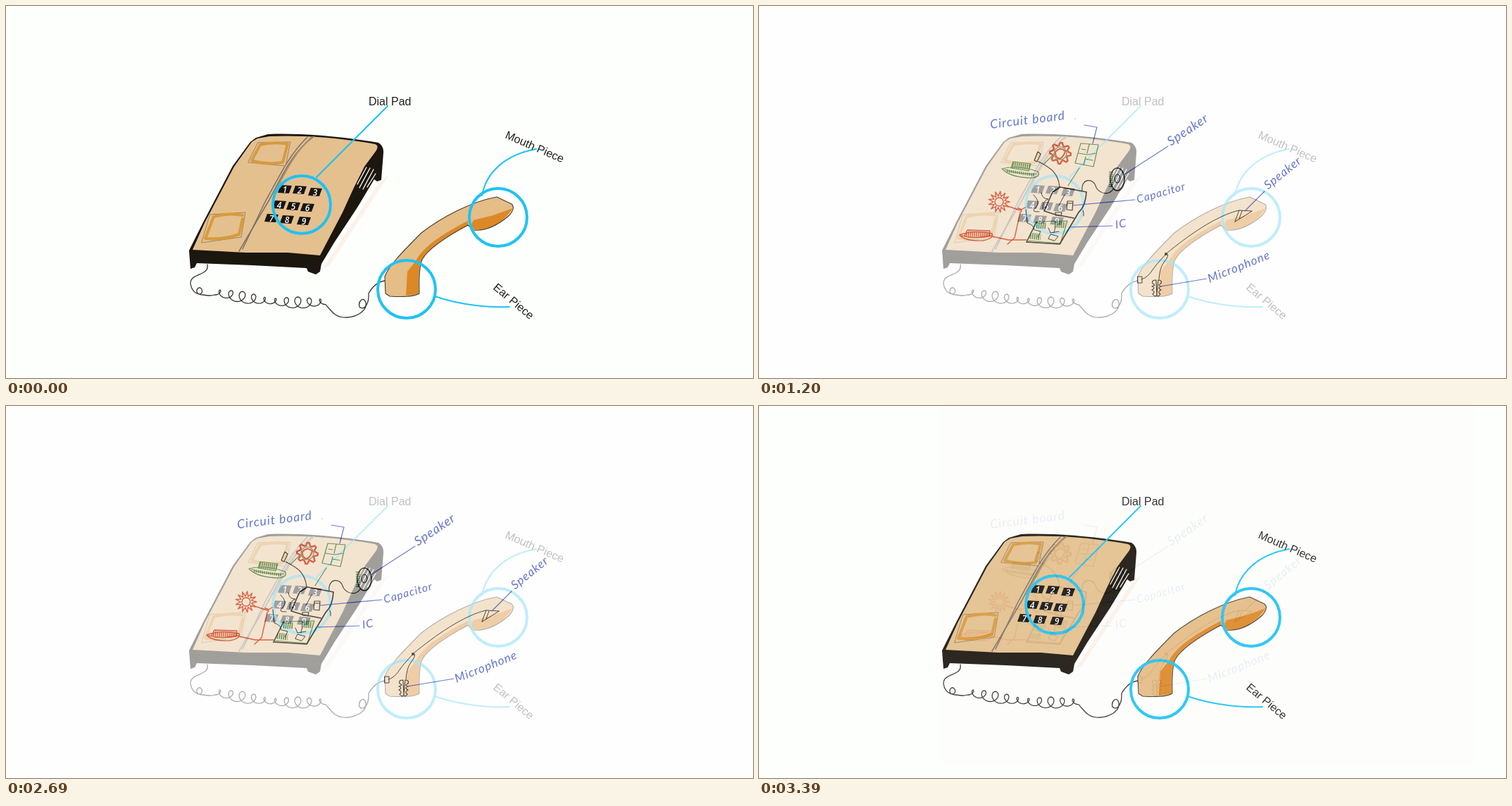
An HTML page for the animation above (3490 ms loop, 1061 by 528 pixels).

```html
<!DOCTYPE html>
<html lang="en">
<head>
<meta charset="utf-8">
<title>Telephone</title>
<style>
html, body { margin: 0; width: 100%; height: 100%; overflow: hidden; background: #fdfffc; }
svg { display: block; }
path, ellipse, circle { fill: none; stroke-linecap: round; stroke-linejoin: round; }
.label { font: 16px "Liberation Sans", Arial, sans-serif; fill: #202020; }
.note { font: italic 16px Lato, "Open Sans", sans-serif; letter-spacing: 1px; fill: #2f43b4; }
.digit { font: italic 600 12px "Open Sans", sans-serif; fill: #fff; text-anchor: middle; }
.ring { stroke: #1ec2f4; stroke-width: 4; }
.lead { stroke: #1ec2f4; stroke-width: 2; }
.ink { stroke: #1c1e21; stroke-width: 1.2; }
.blue { stroke: #3a4db8; stroke-width: 1.2; }
.green { stroke: #3f8449; stroke-width: 1.2; }
.red { stroke: #d2402f; stroke-width: 1.4; }
.hatch { stroke-linecap: butt; stroke-dasharray: 1.6 1.3; }
.bold { stroke-width: 1.7; }
.thin { stroke-width: 1; }
</style>
</head>
<body>
<svg width="1061" height="528" viewBox="0 0 1061 528">
<g id="phone">
  <path d="M545 238L528 253 450 372 459 369Z" style="fill:#fbf2ea"/>
  <path d="M372 182C410 180 470 184 529 194Q537 199 536 209L533 247 527 249 523 246 499 286 466 336 448 366 446 377 440 381 429 377 427 372 350 368 271 365 268 371 262 373 260 347 280 307 322 227 347 193 355 187Z" style="fill:#1b160e"/>
  <path d="M374 185C420 183 475 187 524 196Q530 198 526 205L509 228 494 258 478 293 446 354 400 350 340 350 265 346 282 308 324 228 349 193 357 188Z" style="fill:#e4c08e"/>
  <path d="M437 185C408 207 396 233 374 275L331 348" stroke="#857460" stroke-width="1.6"/>
  <path d="M428 186C402 212 392 235 368 278L336 345" stroke="#76716d" stroke-width="1.5"/>
  <path d="M433 187C405 214 397 238 380 266" stroke="#a5916f" stroke-width="2"/>
  <path d="M358 194L404 193 397 227 344 222Z" stroke="#9b8463" stroke-width="1"/>
  <path d="M361 197Q382 192 400 196L393 222Q369 226 349 219Z" stroke="#d69a40" stroke-width="4"/>
  <path d="M290 296L340 293 334 328 278 336Z" stroke="#9b8463" stroke-width="1"/>
  <path d="M295 299Q316 293 336 297M295 299L283 330Q309 332 331 324L336 302" stroke="#d99a3b" stroke-width="4"/>
  <path d="M512 229L499 253M517 230L502 258M522 232L507 260M525 238L513 257" stroke="#f4f1eb" stroke-width="1.4"/>
  <g id="keys"></g>
  <path id="cord" stroke="#363636" stroke-width="1.3"/>
  <path d="M697 271L718 281Q724 286 715 297C700 310 683 320 664 318L656 311C630 325 600 343 591 360Q586 371 587 408Q578 414 545 412L539 408 538 384C543 370 560 352 590 322C620 299 660 278 697 271Z" style="fill:#e5bd86"/>
  <path d="M720 287L692 297 664 304Q658 312 665 317C686 319 704 309 720 287ZM656 305C625 321 594 339 582 362L570 377 568 411 586 409Q585 371 590 360C602 341 630 324 656 312Z" style="fill:#dc8827"/>
  <path d="M697 271L718 281Q724 286 715 297C700 310 683 320 664 318L656 311C630 325 600 343 591 360Q586 371 587 408Q578 414 545 412L539 408 538 384C543 370 560 352 590 322C620 299 660 278 697 271Z" stroke="#4a3c2a" stroke-width="1.1"/>
</g>

<g>
  <circle class="ring" cx="420" cy="282" r="41"/>
  <circle class="ring" cx="699" cy="300" r="41"/>
  <circle class="ring" cx="569" cy="402" r="41"/>
  <path class="lead" d="M542 142L441 243M676 269C682 236 709 211 753 203M609 412Q660 429 715 427"/>
  <text class="label" x="515" y="141">Dial Pad</text>
  <text class="label" transform="translate(708 187) rotate(23.5)">Mouth Piece</text>
  <text class="label" transform="translate(691 401) rotate(40)">Ear Piece</text>
</g>

<g id="inside" opacity="0">
  <path d="M0 0H1061V528H0Z" style="fill:#fefefe"/>
  <use href="#phone" opacity=".18"/>

  <path class="green" d="M457 195L482 197 475 228 449 223ZM469 196L466 209M464 214L461 226M454 209L466 211 479 209M458 203L464 204M463 217L474 219M455 230L439 255M405 224L416 213"/>
  <path class="green" d="M345 231Q368 225 396 235Q401 242 388 244Q358 244 345 231ZM349 232Q372 240 394 238M358 230L361 221 386 224 383 234Z"/>
  <path class="green hatch" d="M360 226L385 229" style="stroke-width:8"/>
  <path class="green hatch" d="M352 234L392 240" style="stroke-width:4"/>
  <path class="green" d="M394 306L438 305 428 337 381 333Z"/>
  <path class="green hatch" d="M394 311L408 312M420 310L435 311M385 326L400 328" style="stroke-width:9"/>
  <path class="green hatch" d="M500 235V258" style="stroke-width:6"/>

  <path id="gear" class="red" style="stroke-width:2.4"/>
  <circle class="green" cx="428" cy="209" r="9"/>
  <path class="red" d="M421 207Q428 199 435 206Q433 214 427 217Q420 214 421 207Z" style="stroke-width:2"/>
  <path id="sun" class="red"/>
  <circle class="red" cx="341" cy="278" r="6"/>
  <path class="red" d="M353 284L371 290 378 286M368 287Q376 289 371 293L363 329 353 338M285 325Q305 317 331 323Q334 330 318 333Q292 334 285 325ZM288 326Q308 331 330 326M292 326L296 318 328 319 327 327M331 327L354 332 380 332"/>
  <path class="red hatch" d="M294 323L328 324" style="stroke-width:7"/>

  <path class="ink" d="M391 219L396 207 400 210 395 221ZM397 221C413 229 425 236 427 257"/>
  <path class="ink bold" d="M405 291L417 264 428 257 465 264Q464 284 454 293L427 338 380 335M405 291L421 296 447 301"/>
  <path class="ink" d="M459 262C457 244 476 243 479 258C486 268 498 268 503 260M380 335L394 307"/>
  <path class="ink" d="M438 277H446L445 290 437 289ZM438 280H446M421 293H430L429 298 421 297Z"/>
  <path class="ink thin" d="M434 268L426 283M460 290Q462 294 461 298M401 265Q402 274 411 274Q402 277 403 288M390 268Q401 279 393 286Q385 293 398 292M379 289L381 308Q391 311 391 318M392 318L400 320 396 328M411 315L414 322 426 320M411 330L414 324 425 327 420 333ZM421 313L419 322"/>
  <ellipse class="ink bold" cx="509" cy="246" rx="10" ry="16"/>
  <ellipse class="ink" cx="509" cy="245" rx="4" ry="6"/>

  <path class="ink thin" d="M676 306L682 290 700 291ZM682 302L686 291M682 290C650 297 608 327 579 351Q565 366 560 373Q552 386 543 388M579 351Q584 353 575 364Q569 372 568 388M538 384H544V393H538Z"/>
  <circle cx="578" cy="352" r="2" style="fill:#1c1e21"/>
  <path class="ink" d="M564 389Q557 389 559 394Q565 396 558 398Q564 400 558 403Q564 406 559 409Q563 414 565 410ZM567 389Q573 389 571 394Q565 396 571 398Q565 400 571 403Q565 406 570 409Q567 414 565 410Z"/>

  <path class="blue" d="M449 160h.2M462 169L480 172 474 195M581 199L519 239M534 275L446 283M502 312L440 314M718 263L690 291M636 387L570 398"/>
  <g id="notes"></g>
</g>
</svg>

<script>
const get = id => document.getElementById(id);

// Dial pad
get("keys").innerHTML = [
  [396, 260], [417, 261], [439, 264],
  [388, 282], [408, 284], [428, 286],
  [377, 301], [399, 303], [423, 305]
].map(([x, y], i) =>
  `<path d="M${x - 6} ${y - 6}l16 1-4 11-16-1Z" style="fill:#19150f"/>
   <text class="digit" x="${x}" y="${y + 4.5}">${i + 1}</text>`).join("");

// Handwritten notes: text, x, y, angle, size
get("notes").innerHTML = [
  ["Circuit board", 329, 174, -7, 17.5],
  ["Speaker", 585, 199, -34, 18],
  ["Capacitor", 538, 280, -16, 15.5],
  ["IC", 507, 316, -10, 16],
  ["Speaker", 723, 261, -39, 17],
  ["Microphone", 640, 393, -22, 17]
].map(([text, x, y, angle, size]) =>
  `<text class="note" transform="translate(${x} ${y}) rotate(${angle})" style="font-size:${size}px">${text}</text>`).join("");

const polyline = points =>
  points.map(([x, y]) => `L${x.toFixed(1)} ${y.toFixed(1)}`).join("");

// Curly cord: loops that swell and shrink along a sagging line
function cord() {
  const loops = Array.from({ length: 201 }, (_, i) => {
    const u = i / 200, a = u * 20 * Math.PI, r = 6 - 2 * Math.cos(u * 4 * Math.PI);
    return [296 + 158 * u + r * Math.sin(a), 406 + 15 * Math.sin(2 * u) + r * Math.cos(a)];
  });
  return "M286 367C289 384 262 378 262 394C264 411 282 413 278 402C273 394 264 410 280 410Q291 412 296 410" +
    polyline(loops) +
    "C463 434 468 443 484 442C500 441 513 432 511 421C508 411 500 419 502 427C508 433 516 424 515 408Q524 392 538 390";
}

// Closed ring of corners whose radius follows the given cycle
function toothed(cx, cy, teeth, radii) {
  const count = teeth * radii.length;
  const corners = Array.from({ length: count }, (_, i) => {
    const a = i * 2 * Math.PI / count, r = radii[i % radii.length];
    return [cx + r * Math.cos(a), cy + r * Math.sin(a)];
  });
  return "M" + polyline(corners).slice(1) + "Z";
}

get("cord").setAttribute("d", cord());
get("gear").setAttribute("d", toothed(428, 209, 8, [15, 15, 11, 11]));
get("sun").setAttribute("d", toothed(341, 278, 13, [15, 8]));

// Stepped crossfade between the outer view and the inner view
const LOOP = 3490, STEP = 100, STEPS = 11;
const fade = t => Math.max(0, Math.min(1, (Math.floor(t / STEP) + 1) / STEPS));

function draw(now) {
  const t = now % LOOP;
  get("inside").setAttribute("opacity", fade(t - 500) - fade(t - 2490));
  requestAnimationFrame(draw);
}
draw(performance.now());
</script>
</body>
</html>
```
